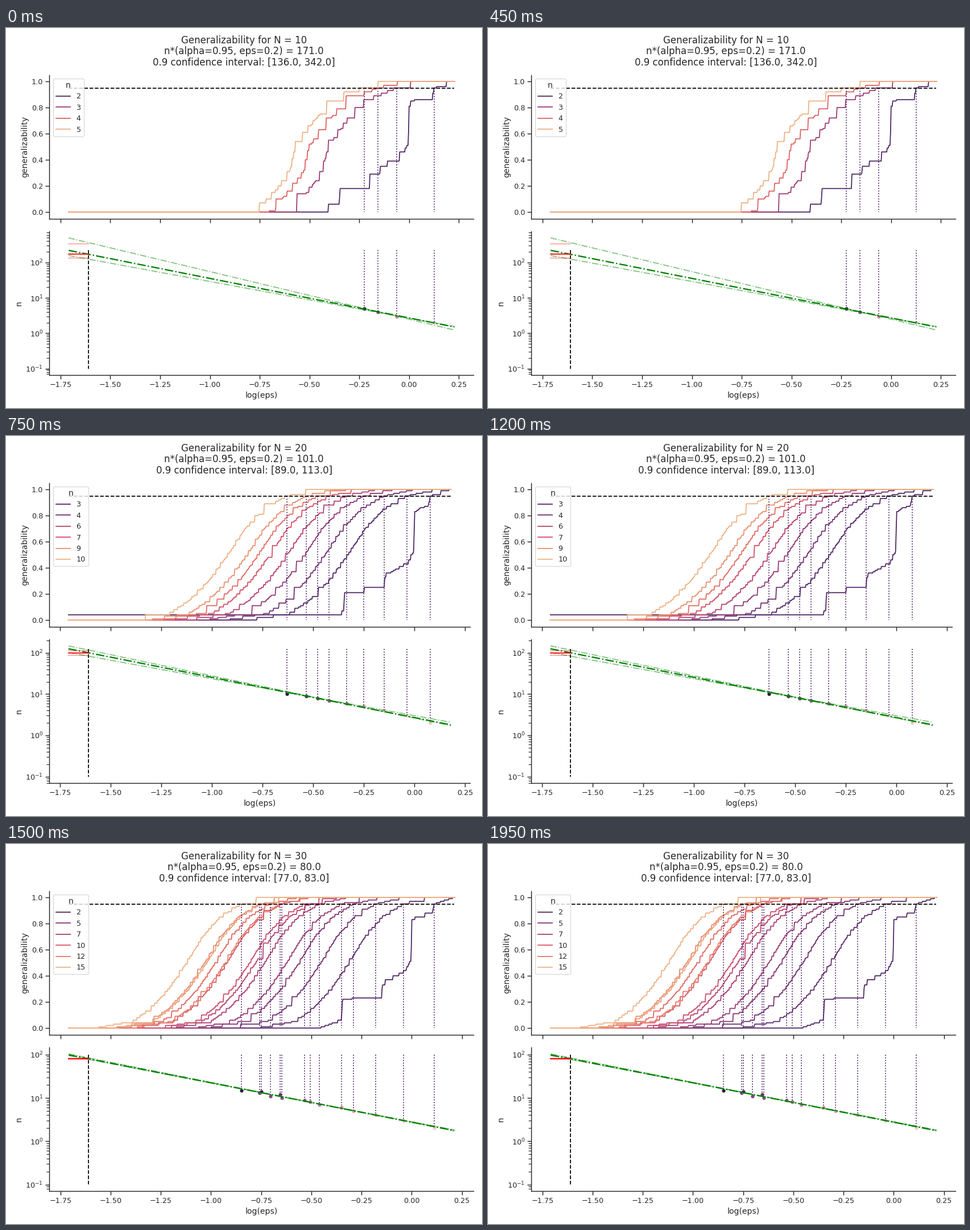
Animation of 837 by 669 pixels, one loop 2.25 s. Source, as a matplotlib script:

```python
import numpy as np
import matplotlib.pyplot as plt
from matplotlib.animation import FuncAnimation
from matplotlib.colors import LinearSegmentedColormap

W, H = 837, 669
S = 1.1625            # pixels per nominal point; at 72 dpi one point is one pixel
INK = "0.15"
LEFT = 76.2
TARGET = np.log(0.2)
LO = TARGET - 0.1
DOTS = "#4e1a64"

plt.rcParams.update({
    "font.family": "DejaVu Sans", "font.size": 12 * S,
    "text.color": INK, "axes.labelcolor": INK, "axes.edgecolor": INK,
    "axes.labelsize": 12 * S, "axes.labelpad": 4 * S, "axes.linewidth": 1.25 * S,
    "axes.spines.top": False, "axes.spines.right": False,
    "lines.linewidth": 1.5 * S, "patch.linewidth": S,
    "legend.fontsize": 11 * S, "legend.title_fontsize": 12 * S,
})
for axis in ("xtick", "ytick"):
    plt.rcParams.update({
        axis + ".color": INK, axis + ".labelsize": 11 * S,
        axis + ".major.size": 6 * S, axis + ".major.width": 1.25 * S,
        axis + ".minor.size": 4 * S, axis + ".minor.width": S,
        axis + ".major.pad": 3.5 * S, axis + ".minor.pad": 3.5 * S,
    })

FLARE = LinearSegmentedColormap.from_list("curves", [
    "#4b2362", "#6c2b6d", "#8f3371", "#b13c6c",
    "#d14a61", "#e3685c", "#e98d6b", "#edb081"])
HELIX = LinearSegmentedColormap.from_list("points", [
    "#edd1cb", "#d499a7", "#aa688f", "#6e4071", "#2d1e3e"])

# Percent levels and how far from the 95 % crossing a curve reaches each.
LEVELS = [0, 5, 15, 30, 50, 70, 85, 95, 100]
SMOOTH = np.array([-0.73, -0.54, -0.45, -0.36, -0.272, -0.192, -0.105, 0, 0.145])
STEEP = np.array([-0.55, -0.515, -0.45, -0.375, -0.345, -0.25, -0.155, 0, 0.14])

# Pairs (n = 2) jump at fixed places whatever N is.
PAIR_X = [-0.46, -0.35, -0.345, -0.15, -0.145, -0.03, -0.003, 0, 0.03]
PAIR_Y = [0, 6, 22, 24, 34, 44, 53, 82, 86]

# cross: 95 % crossings for n = 2, 3, ...; fits: log10(n) at both ends of the
# main line and its two bounds; stairs: distinct levels each curve takes.
SCENES = [
    dict(N=10, star=171, ci=(136, 342), hi=0.2275, right=822.3,
         low=2, entries=4, floor=0, stairs=24, shape=STEEP,
         cross=[0.127, -0.062, -0.156, -0.226],
         fits=[(2.345, 0.177), (2.2, 0.19), (2.698, 0.09)]),
    dict(N=20, star=101, ci=(89, 113), hi=0.18, right=815.8,
         low=3, entries=6, floor=4, stairs=50, shape=SMOOTH * 1.07,
         cross=[0.078, -0.037, -0.149, -0.25, -0.336, -0.422, -0.479, -0.535, -0.63],
         fits=[(2.102, 0.255), (2.01, 0.317), (2.172, 0.235)]),
    dict(N=30, star=80, ci=(77, 83), hi=0.2125, right=822.3,
         low=2, entries=6, floor=0, stairs=55, shape=SMOOTH,
         cross=[0.112, -0.04, -0.18, -0.289, -0.35, -0.46, -0.505, -0.535,
                -0.648, -0.705, -0.657, -0.759, -0.749, -0.849],
         fits=[(1.994, 0.247), (1.978, 0.262), (2.017, 0.237)]),
]

fig = plt.figure(figsize=(W / 72, H / 72), dpi=72, facecolor="white")


def add_axes(right, top, bottom):
    return fig.add_axes([LEFT / W, 1 - bottom / H, (right - LEFT) / W, (bottom - top) / H])


def curve(sc, n, x, grid):
    """Share reached along the grid, rounded to random whole-percent stairs."""
    if n == 2:
        y = np.interp(grid, PAIR_X + [x - 0.01, x, sc["hi"]], PAIR_Y + [87, 95, 100])
        y = np.maximum(y, sc["floor"])
    else:
        y = np.interp(grid, x + sc["shape"], LEVELS)
    rng = np.random.default_rng(100 * sc["N"] + n)
    picks = rng.choice(np.arange(1, 100), sc["stairs"], replace=False)
    stairs = np.unique([0, sc["floor"], *picks, 95, 100])
    return stairs[np.searchsorted((stairs[1:] + stairs[:-1]) / 2, y)] / 100


def draw_upper(ax, sc, points, shade):
    grid = np.linspace(LO, sc["hi"], 700)
    for n, x in points:
        ax.plot(grid, curve(sc, n, x, grid), color=shade(FLARE, n))
    ax.plot([LO, sc["hi"]], [0.95, 0.95], "--", color="black")
    for _, x in points:
        ax.plot([x, x], [0.95, 0], ":", color=DOTS)
    names = np.rint(np.linspace(sc["low"], points[-1][0], sc["entries"])).astype(int)
    handles = [plt.Line2D([], [], color=shade(FLARE, n)) for n in names]
    ax.legend(handles, names, title="n", loc="upper left",
              framealpha=0.8, edgecolor="0.8")
    ax.set_ylim(-0.05, 1.05)
    ax.set_yticks(np.arange(6) / 5)
    ax.set_ylabel("generalizability")
    ax.tick_params(labelbottom=False)


def draw_lower(ax, sc, points, shade):
    ax.set_yscale("log")
    peak = 10 ** sc["fits"][0][0]
    for n, x in points:
        ax.plot([x, x], [peak, n], ":", color=DOTS)
        ax.scatter(x, n, s=36 * S * S, zorder=1, color=shade(HELIX, n),
                   edgecolors="white", linewidths=0.6)
    ax.plot([TARGET, TARGET], [peak, 0.1], "--", color="black")
    for j, (a, b) in enumerate(sc["fits"]):
        ax.plot([LO, sc["hi"]], [10 ** a, 10 ** b], "-.", color="green",
                lw=(1.5 if j else 2) * S, alpha=0.5 if j else 1)
    for j, n in enumerate((sc["star"], *sc["ci"])):
        ax.plot([LO, TARGET], [n, n], color="red", alpha=0.35 if j else 1)
    reach = max(a for a, _ in sc["fits"])
    pad = 0.05 * (reach + 1)
    ax.set_ylim(10 ** (-1 - pad), 10 ** (reach + pad))
    ax.set_ylabel("n")
    ax.set_xlabel("log(eps)")


def draw(i):
    sc = SCENES[i]
    fig.clear()
    fig.suptitle(f"Generalizability for N = {sc['N']}\n"
                 f"n*(alpha=0.95, eps=0.2) = {sc['star']:.1f}\n"
                 f"0.9 confidence interval: [{sc['ci'][0]:.1f}, {sc['ci'][1]:.1f}]",
                 fontsize=14.3 * S, linespacing=1.07)
    points = list(enumerate(sc["cross"], start=2))
    low, top = sc["low"], points[-1][0]

    def shade(cmap, n):
        return cmap(float((n - low) / (top - low)))

    upper = add_axes(sc["right"], 82.5, 335.5)
    lower = add_axes(sc["right"], 358, 611)
    draw_upper(upper, sc, points, shade)
    draw_lower(lower, sc, points, shade)
    margin = 0.05 * (sc["hi"] - LO)
    for ax in (upper, lower):
        ax.set_xticks(np.arange(-7, 2) / 4)
        ax.set_xlim(LO - margin, sc["hi"] + margin)
    return []


anim = FuncAnimation(fig, draw, frames=3, interval=750, repeat=True, repeat_delay=0)
plt.show()
```
